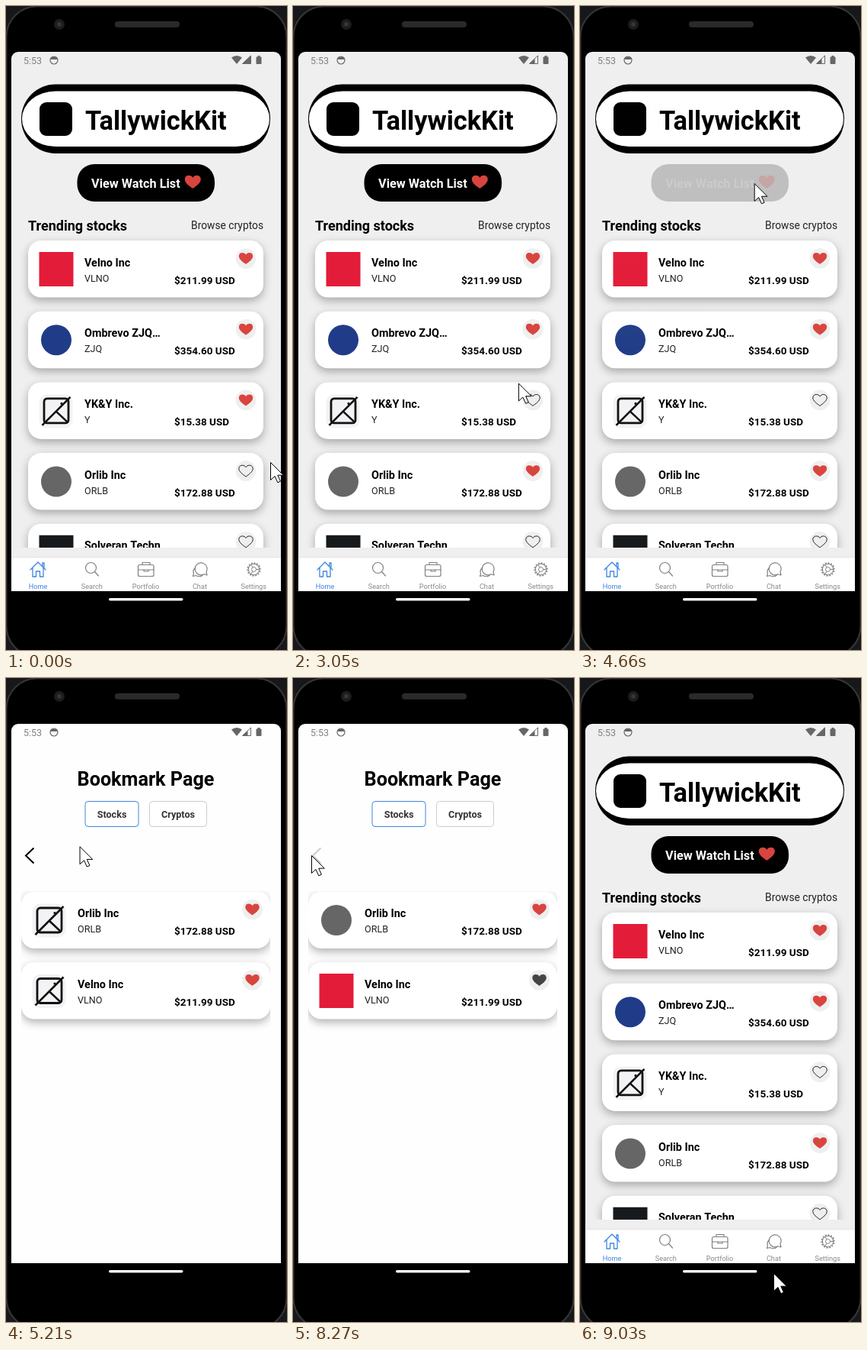
An HTML page with a canvas that plays this animation: 369x843 px, repeating every 9.06 s.

```html
<!DOCTYPE html>
<html lang="en">
<head>
<meta charset="utf-8">
<title>Watch list demo</title>
<style>
  html, body { margin: 0; width: 100%; height: 100%; overflow: hidden; background: #000; }
  canvas { display: block; }
</style>
</head>
<body>
<canvas id="stage" width="369" height="843"></canvas>
<script>
const c = document.getElementById('stage').getContext('2d');
const LOOP = 9060;
const RED = '#d9443f', BLUE = '#3b86e0', GREY = '#808080';

// Pointer path: time, x, y
const PATH = [
  [0, 347, 597], [30, 347, 597], [90, 317, 603], [1470, 317, 603], [1640, 325, 575], [1780, 307, 536],
  [1900, 314, 518], [2940, 314, 518], [3050, 296, 494], [3400, 252, 350], [3600, 228, 270],
  [3790, 219, 230], [4140, 219, 230], [4200, 229, 232], [4660, 229, 232], [4900, 150, 236],
  [5130, 98, 221], [5240, 96, 220], [5520, 183, 185], [5650, 196, 178], [6340, 196, 178],
  [6430, 165, 177], [6550, 132, 178], [7300, 132, 178], [7610, 24, 232], [8470, 24, 232],
  [9030, 254, 779], [LOOP, 254, 779]
];
const CLICKS = [[630, 760], [2250, 2380], [3830, 3970], [5850, 5980], [6810, 6980], [8140, 8270]];

const velno = { name: 'Velno Inc', code: 'VLNO', price: '$211.99 USD', logo: ['square', '#e31c39'] };
const ombrevo = { name: 'Ombrevo ZJQ…', code: 'ZJQ', price: '$354.60 USD', logo: ['circle', '#203c88'] };
const yky = { name: 'YK&Y Inc.', code: 'Y', price: '$15.38 USD' };
const orlib = { name: 'Orlib Inc', code: 'ORLB', price: '$172.88 USD', logo: ['circle', '#666'] };
const solveran = { name: 'Solveran Techn', code: 'SVRN', price: '$15.02 USD', logo: ['square', '#171a1d'] };
const plimtok = { name: 'Plimtok', code: 'plm', price: '$29840.90 USD', logo: ['circle', '#f2942b'] };

const HEART = new Path2D('M0 7.5C-4 4.5-9.2 1-9.2-3C-9.2-5.9-7-7.4-4.7-7.4C-2.5-7.4-.8-6.3 0-4.8' +
  'C.8-6.3 2.5-7.4 4.7-7.4C7-7.4 9.2-5.9 9.2-3C9.2 1 4 4.5 0 7.5Z');
const ARROW = new Path2D('M.5.5V23.5L6 18.5L9.8 26.8L13.4 25.2L9.8 17.2H17.3Z');

const ramp = (t, a, b) => Math.min(1, Math.max(0, (t - a) / (b - a)));
const within = (t, a, b) => t >= a && t < b;

function box(x, y, w, h, r, fill, stroke, width = 1) {
  c.beginPath();
  c.roundRect(x, y, w, h, r);
  if (fill) { c.fillStyle = fill; c.fill(); }
  if (stroke) { c.strokeStyle = stroke; c.lineWidth = width; c.stroke(); }
}

function disc(x, y, r, fill, stroke, width = 1) {
  box(x - r, y - r, 2 * r, 2 * r, r, fill, stroke, width);
}

function path(d, stroke, width = 1.2, fill) {
  const p = new Path2D(d);
  if (fill) { c.fillStyle = fill; c.fill(p); }
  if (stroke) { c.strokeStyle = stroke; c.lineWidth = width; c.stroke(p); }
}

function text(s, x, y, size, color = '#000', weight = 'bold', align = 'left') {
  c.font = `${weight} ${size}px Roboto, sans-serif`;
  c.textAlign = align;
  c.fillStyle = color;
  c.fillText(s, x, y);
}

function group(draw, { x = 0, y = 0, alpha = 1 }) {
  c.save();
  c.translate(x, y);
  c.globalAlpha *= alpha;
  draw();
  c.restore();
}

function clipped(x, y, w, h, r, draw) {
  c.save();
  c.beginPath();
  c.roundRect(x, y, w, h, r);
  c.clip();
  draw();
  c.restore();
}

// like: 0 is an outline, 1 is filled
function heart(x, y, like, color = RED, scale = 1) {
  group(() => {
    c.scale(scale, scale);
    if (like < 1) {
      c.strokeStyle = '#222';
      c.lineWidth = 1;
      c.stroke(HEART);
    }
    c.globalAlpha *= like;
    c.fillStyle = color;
    c.fill(HEART);
  }, { x, y });
}

function missingImage() {
  box(0, 1, 44, 44, 10, '#f3f3f5');
  box(6.5, 6.5, 32, 32, 4, null, '#111', 2.8);
  path('M4 41.5L41 4.5M22 23L38 38', '#111', 2.6);
  disc(29.5, 13, 1.6, '#111');
}

function logo(item, x, y, loaded) {
  group(() => {
    if (!loaded || !item.logo) return missingImage();
    const [shape, color] = item.logo;
    if (shape === 'square') box(0, 0, 45, 45, 0, color);
    else disc(22.5, 22.5, 20, color);
  }, { x, y });
}

function card(item, x, y, w, nameX, heartX, like, loaded = true, heartColor) {
  c.save();
  c.shadowColor = 'rgba(0,0,0,.3)';
  c.shadowBlur = 12;
  c.shadowOffsetY = 4.5;
  box(x, y, w, 74.5, 17, '#fff');
  c.restore();
  logo(item, x + 14.5, y + 15, loaded);
  text(item.name, nameX, y + 33.5, 14.4);
  text(item.code, nameX, y + 53.5, 12.6, '#222', 'normal');
  text(item.price, 221, y + 56.5, 13.5);
  disc(heartX, y + 23.5, 13.3, '#efefef');
  heart(heartX, y + 23.5, like, heartColor);
}

function tabs() {
  box(7, 722, 354, 44, 0, '#fff');
  box(7, 721, 354, 1, 0, '#e2e2e2');
  c.lineJoin = c.lineCap = 'round';
  path('M32 738L42 728L52 738M35 735.5V747H39.5V740H44.5V747H49V735.5M48 733V729H50V735', BLUE, 1.3);
  disc(111.5, 735.5, 7, null, GREY, 1.2);
  path('M116.5 740.5L121.5 746', GREY, 1.2);
  box(173.5, 731.5, 20.5, 15, 2, null, GREY, 1.2);
  path('M179 731V728.5H189V731M173.5 738H194M181 738V740H187V738', GREY, 1.2);
  path('M250.5 742.5A8 8 0 1 1 263 741L264 745L260 743.7A8 8 0 0 1 250.5 742.5', GREY);
  path('M248 736A6.5 6.5 0 0 0 246.5 743L245.5 746.5L249.5 745.5Q254 748 258 745.5', GREY);
  c.lineCap = 'butt';
  disc(325.5, 737.5, 7.2, null, GREY, 1.1);
  disc(325.5, 737.5, 3, null, GREY, 1);
  c.setLineDash([1.9, 1.9]);
  disc(325.5, 737.5, 8.5, null, GREY, 1.4);
  c.setLineDash([]);
  path('M328.5 737.5H332.7M324 734.9L321.9 731.3M324 740.1L321.9 743.7', GREY, 1);
  c.lineJoin = 'miter';
  ['Home', 'Search', 'Portfolio', 'Chat', 'Settings'].forEach((s, i) =>
    text(s, 42 + i * 70.8, 763.3, 9.2, i ? '#888' : BLUE, 'normal', 'center'));
}

function home(t) {
  box(7, 60, 354, 706, 0, '#efefef');
  box(20, 102.5, 327, 90.5, 45, '#000');
  box(21, 111.5, 325, 72.5, { x: 44, y: 36 }, '#fff');
  box(44, 126, 43, 44, 9, '#000');
  text('TallywickKit', 104, 161.5, 34.4);

  group(() => {
    box(93.5, 207, 180.5, 49, 22.5, '#000');
    text('View Watch List', 112, 238, 16.3, '#fff');
    heart(245.3, 230.3, 1, RED, 1.14);
  }, { alpha: within(t, 3940, 4680) ? 0.2 : 1 });

  text('Trending stocks', 29, 293.5, 18);
  text('Browse cryptos', 338, 292, 13.8, '#222', 'normal', 'right');
  const rows = [
    [velno, 1], [ombrevo, 1], [yky, 1 - ramp(t, 2680, 2810)],
    [orlib, ramp(t, 1070, 1230)], [solveran, 0]
  ];
  clipped(7, 300, 354, 409, 0, () => rows.forEach(([item, like], i) =>
    card(item, 29, 307 + i * 92.7, 309, 103, 315, like)));
  tabs();
}

function toggle(s, x, w, selected, pressed) {
  group(() => {
    box(x + .5, 161.5, w, 33, 4, '#fff', selected ? BLUE : '#c9ccd0');
    text(s, x + w / 2 + .5, 183, 12.6, '#333', 'bold', 'center');
  }, { alpha: pressed ? 0.2 : 1 });
}

function bookmarks(t) {
  const crypto = within(t, 6040, 7260);
  box(7, 60, 354, 706, 0, '#fefefe');
  text('Bookmark Page', 183.5, 140.5, 25.2, '#000', 'bold', 'center');
  toggle('Stocks', 103.5, 70, !crypto, within(t, 7020, 7260));
  toggle('Cryptos', 188, 75, crypto, within(t, 5980, 7020));
  group(() => path('M36.5 222.5L26 232.5L36.5 242.5', '#000', 2), { alpha: t >= 8200 ? 0.2 : 1 });

  const row = (item, y, loaded, color) => card(item, 20, y, 327, 94, 323.5, 1, loaded, color);
  clipped(20, 279, 327, 190, 0, () => {
    if (crypto) return row(plimtok, 279.5, t >= 7020);
    row(orlib, 279.5, t >= 7830);
    row(velno, 372, t >= 7830, t >= 7260 ? '#444' : RED);
  });
}

function statusBar(t) {
  const ink = '#666';
  text('5:53', 23, 75.5, 12.5, GREY, 'normal');
  disc(63, 71, 5, null, ink, 1.2);
  path('M58.5 68.5Q63 64 67.5 68.5L66.5 70H59.5Z', null, 0, ink);
  path('M296 67.5Q303 62.5 310 67.5L303 76Z', null, 0, ink);
  const weak = within(t, 2600, 8600);
  path('M310.5 75.5L321.5 65V75.5Z', ink, 1, weak ? null : ink);
  if (weak) path('M310.5 75.5L317.5 69V75.5Z', null, 0, ink);
  box(328.5, 66.5, 7, 9.5, 1, ink);
  box(330.5, 65, 3, 2, 0, ink);
}

function phone() {
  box(0, 0, 369, 843, 0, '#17181b');
  box(.5, .5, 368, 851, 40, '#000', '#363636', 2);
  disc(70, 24, 7, '#1d1d1f');
  disc(70, 24, 3, '#34343a');
  box(143, 20, 85, 8, 4, '#2a2a2a');
  box(135, 775, 97.5, 3.5, 1.7, '#f4f4f4');
}

function pointer(t) {
  const i = PATH.findIndex(p => p[0] > t);
  const [t0, x0, y0] = PATH[i - 1], [t1, x1, y1] = PATH[i];
  const k = ramp(t, t0, t1);
  const x = x0 + (x1 - x0) * k, y = y0 + (y1 - y0) * k;
  if (CLICKS.some(([a, b]) => within(t, a, b))) disc(x, y, 18, 'rgba(255,255,0,.47)');
  group(() => {
    c.fillStyle = '#fff';
    c.fill(ARROW);
    c.strokeStyle = '#000';
    c.lineWidth = 1;
    c.stroke(ARROW);
  }, { x, y });
}

function frame(now) {
  const t = now % LOOP;
  const page = ramp(t, 4660, 4900) - ramp(t, 8500, 8740);
  phone();
  clipped(7, 60, 354, 706, [9, 9, 0, 0], () => {
    if (page < 1) home(t);
    if (page > 0) group(() => bookmarks(t), { alpha: page });
    statusBar(t);
  });
  pointer(t);
}

const start = performance.now();
function tick() {
  frame(performance.now() - start);
  requestAnimationFrame(tick);
}
tick();
</script>
</body>
</html>
```
